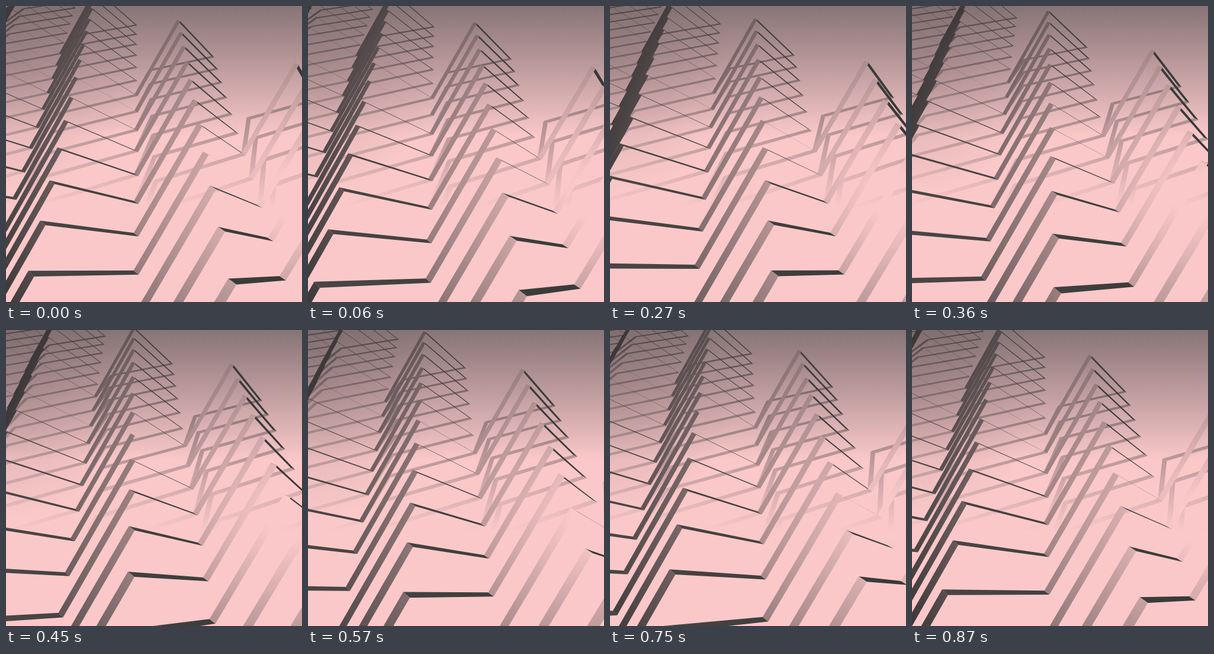
Animation of 500x500 px, one loop 0.9 s. Source, as an HTML page with a canvas:

```html
<!DOCTYPE html>
<html lang="en">
<head>
<meta charset="utf-8">
<title>Folded ribbons</title>
<style>
html, body { margin: 0; width: 100%; height: 100%; overflow: hidden; background: #fac8c9; }
canvas { display: block; width: 500px; height: 500px; }
</style>
</head>
<body>
<canvas id="stage" width="500" height="500"></canvas>
<script>
const ctx = document.getElementById('stage').getContext('2d');
const LOOP = 900;
const PINK = '#fac8c9';

// Vanishing point of the receding rows.
const VX = 220, VY = -324;

// Homogeneous point from offsets to the vanishing point and a depth.
const hom = (dx, dy, depth) => [dx + VX * depth, dy + VY * depth, depth];
const add = (a, b, s = 1) => a.map((n, i) => n + b[i] * s);

const ORIGIN = hom(0, 774, 1);
const COLUMN = hom(244.6, 0, -0.0124);
const ROW = hom(0, 0, 0.0902);
const PEAK = hom(116, -210.5, -0.0154);
const CORNER = hom(41.8, 0, 0.158);
const TRAVEL = add(COLUMN, ROW, 3);

// Half the ribbon width, pointing away from its own vanishing point.
const HALF = [800, 390, -1].map(n => n * 0.0042);

function withStops(gradient, from, to) {
  gradient.addColorStop(0, from);
  gradient.addColorStop(1, to);
  return gradient;
}

const linear = (x0, y0, x1, y1, from, to) =>
  withStops(ctx.createLinearGradient(x0, y0, x1, y1), from, to);
const radial = (x, y, r0, r1, from, to) =>
  withStops(ctx.createRadialGradient(x, y, r0, x, y, r1), from, to);

const sky = linear(0, 0, 0, 220, '#877476', PINK);
const haze = radial(0, 100, 0, 220, 'rgba(70,60,62,0.2)', 'rgba(70,60,62,0)');
const floorTone = linear(0, 0, 0, 340, '#4b4244', PINK);
const shadeTone = linear(0, 0, 500, 0, '#4a4645', '#363a37');
const wallTone = radial(480, 320, 35, 510, PINK, '#3d393a');

const lineTo = p => ctx.lineTo(p[0] / p[2], p[1] / p[2]);

function paint(color, faces) {
  ctx.fillStyle = color;
  for (const [a, b] of faces) {
    ctx.beginPath();
    lineTo(add(a, HALF, -1));
    lineTo(add(b, HALF, -1));
    lineTo(add(b, HALF));
    lineTo(add(a, HALF));
    ctx.fill();
  }
}

function draw(phase) {
  const floor = [], shade = [], wall = [];
  const added = Math.floor(phase * 6 + 1e-4);

  for (let col = -5; col <= 3; col++) {
    for (let row = 7 - 3 * col + added; row >= -5; row--) {
      let start = add(add(ORIGIN, COLUMN, col), ROW, row);
      start = add(start, TRAVEL, -phase);
      if (start[2] < 0.12) continue;
      const end = add(start, TRAVEL);
      const peak = add(start, PEAK);
      const corner = add(start, CORNER);
      floor.push([start, corner], [corner, end]);
      shade.push([peak, end]);
      wall.push([start, peak]);
    }
  }

  for (const tone of [sky, haze]) {
    ctx.fillStyle = tone;
    ctx.fillRect(0, 0, 500, 500);
  }
  paint(floorTone, floor);
  paint(shadeTone, shade);
  paint(wallTone, wall);
}

function tick() {
  draw((performance.now() % LOOP) / LOOP);
  requestAnimationFrame(tick);
}
tick();
</script>
</body>
</html>
```
